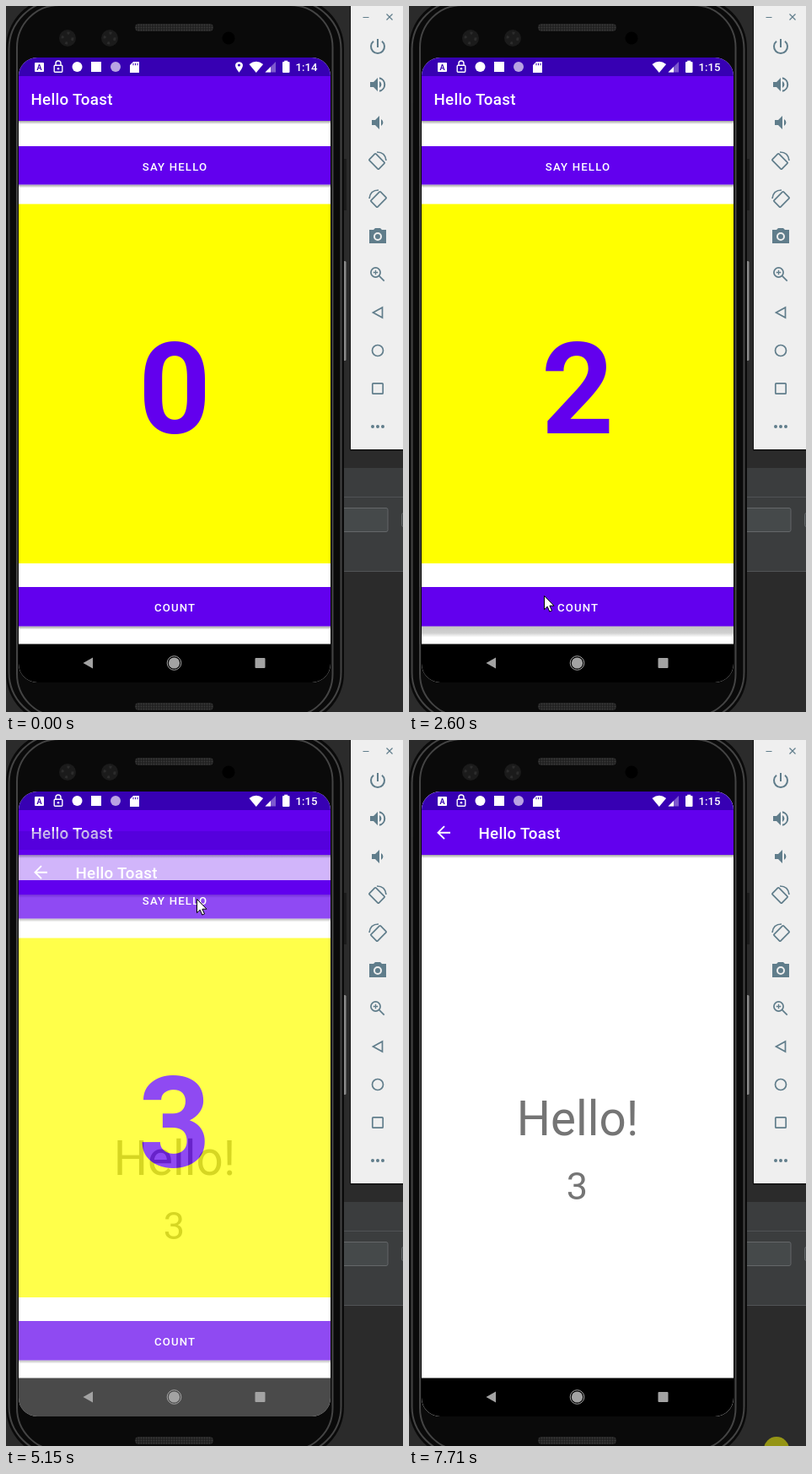
An HTML page for the animation above (7780 ms loop, 471 by 836 pixels).

```html
<!DOCTYPE html>
<html lang="en">
<head>
<meta charset="utf-8">
<title>Hello Toast</title>
<style>
  html, body { margin: 0; width: 100%; height: 100%; overflow: hidden; background: #2b2b2b; }
  svg { display: block; }
  text { font-family: Roboto, sans-serif; }
  .title { font-size: 18.8px; font-weight: 500; fill: #fff; letter-spacing: .27px; }
  .label { font-size: 13.2px; font-weight: 500; fill: #fff; letter-spacing: 1.18px; text-anchor: middle; }
  .count { font-size: 150px; font-weight: 700; fill: #6200ee; text-anchor: middle; }
  .grey { fill: #757575; text-anchor: middle; }
  .clock { font-size: 13.2px; font-weight: 500; }
  .edge { fill: none; stroke: #444; stroke-width: 2; }
  #tools { fill: none; stroke: #607d8b; stroke-width: 1.7; }
  #tools .solid { fill: #607d8b; stroke: none; }
</style>
</head>
<body>
<svg width="471" height="836">
  <defs>
    <clipPath id="glass"><rect x="15" y="61" width="370" height="740" rx="22"/></clipPath>
    <pattern id="mesh" width="3" height="3" patternUnits="userSpaceOnUse">
      <rect width="3" height="3" fill="#202020"/><circle cx="1.5" cy="1.5" r=".9" fill="#3a3a3a"/>
    </pattern>
    <linearGradient id="low" x2="0" y2="1">
      <stop stop-color="#a0a0a0"/><stop offset="1" stop-color="#fff"/>
    </linearGradient>
    <linearGradient id="high" x2="0" y2="1">
      <stop stop-color="#c4c4c4"/><stop offset=".6" stop-color="#d0d0d0"/><stop offset="1" stop-color="#fff"/>
    </linearGradient>
    <g id="camera"><circle r="10" fill="#1b1b1b"/><circle r="6" fill="none" stroke="#2c2c2c" stroke-width="3" stroke-dasharray="3 6"/></g>
    <rect id="speaker" x="153" width="93" height="9" rx="4.5" fill="url(#mesh)"/>
  </defs>

  <!-- desktop -->
  <rect y="547" width="471" height="122" fill="#3b3d3e"/>
  <path d="M380 581.5h91M380 669.5h91" stroke="#505355"/>
  <g fill="#45494a" stroke="#646769">
    <rect x="380" y="594.5" width="73" height="28" rx="2"/><rect x="469.5" y="600.5" width="20" height="16" rx="2"/>
  </g>

  <!-- phone body -->
  <rect x="400" y="181" width="4" height="61" fill="#1c1c1c"/>
  <rect x="400" y="302" width="3.5" height="118" rx="1.5" fill="#8a8a8a"/>
  <rect y="-10" width="401" height="860" rx="60" fill="#0a0a0a"/>
  <rect class="edge" x="3.5" y="-6" width="394" height="852" rx="57"/>
  <rect class="edge" x="13" y="-1" width="374.5" height="842" rx="50"/>
  <use href="#speaker" y="21"/><use href="#speaker" y="825"/>
  <use href="#camera" x="73" y="38"/><use href="#camera" x="123" y="38"/>
  <circle cx="264" cy="38" r="7.5"/>

  <g clip-path="url(#glass)">
    <g id="first" transform="translate(15 61)"></g>
    <g transform="translate(15 61)"><g id="second"></g></g>

    <!-- status icons -->
    <g fill="#fff">
      <rect x="34" y="67" width="11" height="11" rx="1"/>
      <text x="39.5" y="75.7" font-size="9" font-weight="700" fill="#3700b3" text-anchor="middle">A</text>
      <g fill="none" stroke="#fff" stroke-width="1.4">
        <rect x="57.2" y="70.2" width="9.6" height="8" rx="1"/><path d="M59 70v-2a3 3 0 0 1 6 0v2"/>
      </g>
      <circle cx="62" cy="74.2" r="1.3"/>
      <circle cx="84.5" cy="72" r="6"/>
      <rect x="101" y="66" width="12" height="12"/>
      <circle cx="130" cy="72" r="6" fill="#b9a3e3"/>
      <path d="M151 66h7v13h-11v-9z"/>
      <path d="M150.500 69h6" stroke="#3700b3" stroke-width="2.500" stroke-dasharray="1 1.500"/>
      <g id="pin"><path d="M272 70a4.600 4.600 0 0 1 9 0q0 3-4.500 8.700q-4.500-5.700-4.500-8.700"/><circle cx="276.500" cy="70" r="1.600" fill="#3700b3"/></g>
      <path d="M288.500 69q8.300-6.500 16.600 0l-8.300 10z"/>
      <path d="M320 66v12.500h-12.500z" opacity=".35"/><path d="M314 72v6.500h-6.500z"/>
      <rect x="328" y="66" width="8.500" height="13" rx="1"/><rect x="330.200" y="64.700" width="4" height="2"/>
      <text id="clock" class="clock" x="343.500" y="77"></text>
    </g>

    <!-- navigation keys -->
    <g fill="#a3a3a3">
      <path d="M91.500 778l11.500-6.500v13z"/>
      <circle cx="199.500" cy="778" r="6.600"/><circle cx="199.500" cy="778" r="8.300" fill="none" stroke="#a3a3a3"/>
      <rect x="295.500" y="772" width="12" height="12" rx="1"/>
    </g>
  </g>

  <!-- emulator tools -->
  <rect x="408" width="63" height="526.500" fill="#111"/>
  <rect x="409" width="62" height="525" fill="#efefef"/>
  <path d="M423.500 13.500h7M451.500 9.500l7 7m0-7l-7 7" stroke="#607d8b" stroke-width="1.200"/>
  <g id="tools"></g>

  <g id="pointer">
    <circle id="press" r="15" fill="#ff0" fill-opacity=".5"/>
    <path d="M.5 .5v16.200l3.700-3.500 2.600 5.900 2.700-1.200-2.600-5.700h5.100z" fill="#fff" stroke="#000"/>
  </g>
</svg>
<script>
const LOOP = 7780, TICK = 76.7, PURPLE = '#6200ee';
const $ = id => document.getElementById(id);

// Screen parts, measured from the top left of the glass.
const band = (y, height, fill, id = '') =>
  `<rect id="${id}" y="${y}" width="370" height="${height}" fill="${fill}"/>`;
const button = (id, y, height, depth, text) =>
  band(y + height, 4, 'url(#low)') + band(y + height, depth, 'url(#high)', id) +
  band(y, height, PURPLE) + `<text class="label" x="185.6" y="${y + 28.5}">${text}</text>`;
const page = (titleX, body) =>
  band(0, 740, '#fff') + band(75, 4, 'url(#low)') + band(0, 22, '#3700b3') + band(22, 53, PURPLE) +
  `<text class="title" x="${titleX}" y="56">Hello Toast</text>` + body + band(694.5, 46, '#000');

$('first').innerHTML = page(14.5,
  button('helloLift', 105, 45.5, 7, 'SAY HELLO') + band(173.5, 425.5, '#ff0') +
  '<text id="count" class="count" x="185" y="445"></text>' +
  button('countLift', 627, 46.5, 13, 'COUNT'));
$('second').innerHTML = page(67.5,
  '<path d="M34 48.7H19.5m7.500-7.500l-7.500 7.500 7.500 7.500" fill="none" stroke="#fff" stroke-width="1.900"/>' +
  '<text class="grey" x="185" y="407" font-size="56.5">Hello!</text>' +
  '<text class="grey" x="184.5" y="483" font-size="45">3</text>');

// Tool icons, each drawn around its own centre.
const horn = '<path class="solid" d="M-9-3v6h4l5 5V-8l-5 5zM2-4a4.500 4.500 0 0 1 0 8z"/>';
const turn = '<rect x="-8" y="-5.500" width="16" height="11" rx="1" transform="translate(-1 1) rotate(45)"/><path d="M-1-10q10 0 11 10"/>';
const icons = [
  '<path d="M0-9V1M-5-6.200A8 8 0 1 0 5-6.200" stroke-width="2"/>',
  horn + '<path d="M2-7.800a8 8 0 0 1 0 15.600" stroke-width="2"/>',
  `<g transform="translate(2)">${horn}</g>`,
  turn,
  `<g transform="scale(-1 1)">${turn}</g>`,
  '<path class="solid" d="M-10-8h5l2-2h6l2 2h5V8h-20z"/><circle r="4" stroke="#efefef" stroke-width="2"/>',
  '<circle cx="-2.500" cy="-2.500" r="5.600"/><path d="M1.700 1.700l6 6"/><path d="M-5.300-2.500h5.600m-2.800-2.800v5.600" stroke-width="1.300"/>',
  '<path d="M5.500-6v12l-11-6z"/>',
  '<circle r="6.500"/>',
  '<rect x="-6.200" y="-6.200" width="12.400" height="12.400" rx="1"/>',
  '<path d="M-6 0h13" stroke-width="4" stroke-linecap="round" stroke-dasharray="0 6"/>'
];
$('tools').innerHTML = icons.map((icon, i) => `<g transform="translate(441 ${48 + 45 * i})">${icon}</g>`).join('');

const ramp = (t, from, to) =>
  Math.min(1, Math.max(0, Math.floor((t - from) / TICK + .05) * TICK / (to - from)));
const smooth = p => p * p * (3 - 2 * p);

const countPresses = [0, 1, 2].map(n => 1730 + 475 * n);
const presses = [...countPresses, 4290, 7710];
const glides = [
  { from: 140, to: 670, x: 135, y: 746 },
  { from: 670, to: 960, x: 156, y: 743 },
  { from: 1195, to: 1420, x: 160, y: 698 },
  { from: 3445, to: 3905, x: 226, y: 188 },
  { from: 6395, to: 7160, x: 436, y: 840 }
];

function pointerAt(t) {
  let x = 308, y = 809;
  for (const glide of glides) {
    const p = smooth(ramp(t, glide.from, glide.to));
    x += (glide.x - x) * p;
    y += (glide.y - y) * p;
  }
  return `translate(${Math.round(x)} ${Math.round(y)})`;
}

function draw(t) {
  $('pointer').setAttribute('opacity', +(t >= 140));
  $('pointer').setAttribute('transform', pointerAt(t));
  $('press').setAttribute('opacity', +presses.some(at => t >= at && t < at + 160));

  $('count').textContent = countPresses.filter(at => t >= at + 320).length;
  $('countLift').setAttribute('opacity', ramp(t, 1830, 1985) - ramp(t, 3365, 3595));
  $('helloLift').setAttribute('opacity', ramp(t, 4290, 4445) - (t >= 4920));

  const later = t >= 2290;
  $('clock').textContent = later ? '1:15' : '1:14';
  $('pin').setAttribute('opacity', +!later);

  const p = ramp(t, 5150, 5380);
  $('second').setAttribute('opacity', t < 5150 ? 0 : .29 + .71 * p);
  $('second').setAttribute('transform', `translate(0 ${47 * (1 - p) ** 2})`);
}

const start = performance.now();
(function tick() {
  draw((performance.now() - start) % LOOP);
  requestAnimationFrame(tick);
})();
</script>
</body>
</html>
```
